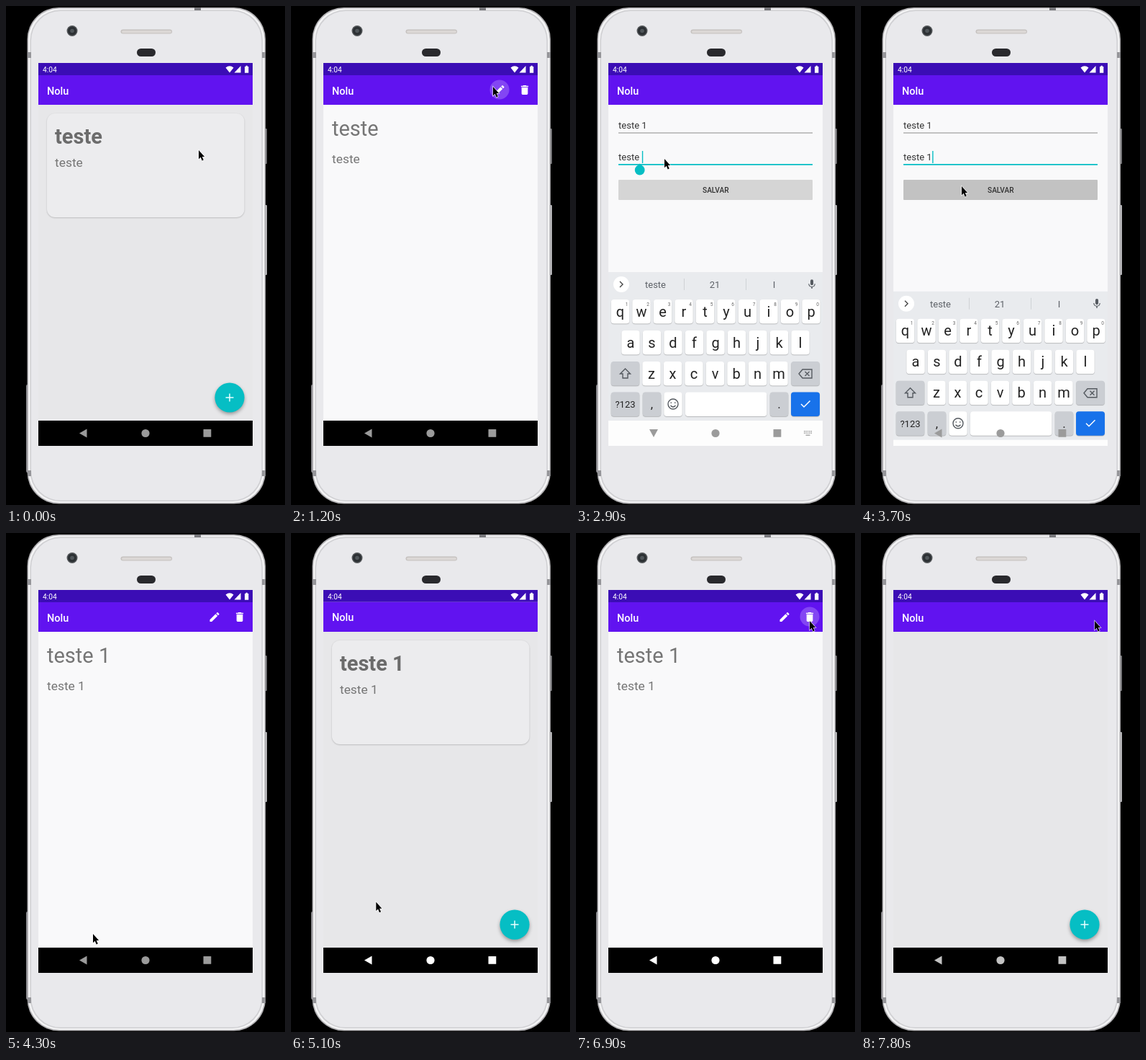
Recreate the animation shown at these times as an HTML page with a canvas. Size 388x692 px, loop 7900 ms.

```html
<!DOCTYPE html>
<html lang="pt">
<head>
<meta charset="utf-8">
<title>Nolu</title>
<style>
html, body { margin: 0; width: 100%; height: 100%; overflow: hidden; background: #000; }
canvas { display: block; }
</style>
</head>
<body>
<canvas id="stage" width="388" height="692"></canvas>
<script>
const ctx = document.getElementById('stage').getContext('2d');
const LOOP = 7900, STEP = 100;
const TEAL = '#06bec4', PURPLE = '#6113f0', DARK_PURPLE = '#3b0db5', GREY = '#757575';
const SCREEN = { x: 45, y: 79, w: 298, h: 531 };
const ICONS = {
  edit: 'M3 17.25V21h3.75L17.81 9.94l-3.75-3.75L3 17.25zM20.71 7.04a1 1 0 0 0 0-1.41l-2.34-2.34a1 1 0 0 0-1.41 0l-1.83 1.83 3.75 3.75z',
  trash: 'M6 19a2 2 0 0 0 2 2h8a2 2 0 0 0 2-2V7H6zM19 4h-3.5l-1-1h-5l-1 1H5v2h14z',
  mic: 'M12 14a3 3 0 0 0 3-3V5a3 3 0 0 0-6 0v6a3 3 0 0 0 3 3zM17.3 11a5.3 5.3 0 0 1-10.6 0H5a7 7 0 0 0 6 6.7V21h2v-3.3a7 7 0 0 0 6-6.7z',
  pointer: 'M0 0V13L3 10.3L5.2 15.3L7.5 14.3L5.3 9.5H9Z'
};

const clamp = v => Math.max(0, Math.min(1, v));
const between = (t, a, b) => t >= a && t < b;

function rect(x, y, w, h, color, r = 0) {
  ctx.fillStyle = color;
  ctx.beginPath();
  ctx.roundRect(x, y, w, h, r);
  ctx.fill();
}

function circle(x, y, r, color) {
  ctx.fillStyle = color;
  ctx.beginPath();
  ctx.arc(x, y, r, 0, 7);
  ctx.fill();
}

function text(s, x, y, size, color, weight = 400, align = 'left') {
  ctx.font = `${weight} ${size}px Roboto, sans-serif`;
  ctx.textAlign = align;
  ctx.fillStyle = color;
  ctx.fillText(s, x, y);
}

function poly(d, color) {
  ctx.fillStyle = color;
  ctx.fill(new Path2D(d));
}

function line(d, color, width = 1.4) {
  ctx.strokeStyle = color;
  ctx.lineWidth = width;
  ctx.stroke(new Path2D(d));
}

function icon(name, x, y, color, scale = 0.725) {
  ctx.save();
  ctx.translate(x, y);
  ctx.scale(scale, scale);
  ctx.translate(-12, -12);
  poly(ICONS[name], color);
  ctx.restore();
}

function shadowed(blur, dy, color, draw) {
  ctx.save();
  ctx.shadowBlur = blur;
  ctx.shadowOffsetY = dy;
  ctx.shadowColor = color;
  draw();
  ctx.restore();
}

function phone() {
  rect(0, 0, 388, 692, '#000');
  rect(359, 170, 4, 49, '#77777a', 1);
  rect(359, 276, 4, 97, '#b5b5b8', 1);
  rect(28, 525, 5, 122, '#8d8d91', 2);
  rect(29.5, 2, 331.5, 688.5, '#b1b0b3', 44);
  rect(31, 3.5, 328.5, 685.5, '#f4f4f5', 43);
  rect(33.5, 5.5, 323.5, 681.5, '#cfcfd2', 42);
  rect(35, 7, 320.5, 678.5, '#e9e9ec', 41);
  for (const y of [64, 644]) for (const x of [30, 356]) rect(x, y, 5, 8, '#96969a');
  rect(262, 2, 9, 4, '#77777b');
  rect(159.5, 32.5, 71.5, 6, '#c6c2c0', 3);
  rect(161, 34, 69, 3.5, '#dcd8d6', 2);
  circle(92, 34.5, 7.5, '#55585b');
  circle(92, 34.5, 6, '#2c3033');
  circle(92, 34.5, 2.8, '#50565a');
  rect(182, 59, 26, 11, '#29292d', 5.5);
}

function chrome(background) {
  rect(45, 79, 298, 531, background);
  rect(45, 79, 298, 17, DARK_PURPLE);
  rect(45, 96, 298, 41, PURPLE);
  text('Nolu', 57, 122.5, 14.5, '#fff', 500);
  rect(45, 575, 298, 35, '#000');
}

const list = note => t => {
  chrome('#e7e7e9');
  if (note) {
    shadowed(2, 0.7, 'rgba(0,0,0,.22)', () => rect(57, 149, 274.5, 144, '#ececee', 11));
    if (between(t, 400, 700) || between(t, 5800, 6000)) rect(57, 149, 274.5, 144, 'rgba(0,0,0,.06)', 11);
    text(note, 68, 191, 29, '#6b6b6b', 700);
    text(note, 68, 223, 17.4, GREY);
  }
  shadowed(5, 2.5, 'rgba(0,0,0,.35)', () => circle(311, 543, 20.6, TEAL));
  line('M305.5 543H316.5M311 537.5V548.5', '#e8ffff', 1.5);
};

const detail = note => t => {
  chrome('#f9f9fa');
  if (between(t, 1200, 1500)) circle(290, 116, 13.5, 'rgba(255,255,255,.22)');
  if (between(t, 6900, 7200)) circle(325, 116, 13.5, 'rgba(255,255,255,.22)');
  icon('edit', 290, 116.5, '#fff');
  icon('trash', 325, 116.5, '#fff');
  text(note, 57, 180, 29, GREY);
  text(note, 57, 217.5, 17.4, GREY);
};

function field(value, y, focused, handle) {
  text(value, 59, y, 13.05, '#333');
  const caret = 59.5 + ctx.measureText(value).width;
  if (!focused) return rect(59, y + 5.5, 270, 1, '#8b8b8b');
  rect(59, y + 5, 270, 1.7, TEAL);
  rect(caret, y - 13, 1.4, 17, TEAL);
  if (handle) {
    circle(88.7, y + 13.5, 6.9, TEAL);
    poly(`M88.7 ${y + 4.5}L94 ${y + 9.5}H83.4Z`, TEAL);
  }
}

function form(t) {
  const typed = (space, digit) => t < space ? 'teste' : t < digit ? 'teste ' : 'teste 1';
  const second = t >= 2600;
  chrome('#f9f9fa');
  field(typed(1900, 2200), 170, t >= 1700 && !second, t < 2200);
  if (between(t, 1800, 2200)) rect(59, 172, 29, 1, '#444');
  field(typed(2800, 3000), 214, second, between(t, 2700, 3000));
  rect(59, 241, 270, 28, between(t, 3600, 3900) ? '#c2c2c2' : '#d5d5d5', 1);
  text('SALVAR', 194.3, 258.6, 10.15, '#333', 500, 'center');
}

function key(x, y, w, label, size = 20, color = '#fff') {
  shadowed(1, 0.7, 'rgba(0,0,0,.28)', () => rect(x - w / 2, y - 17, w, 33.5, color, 4));
  if (label) text(label, x, y + size * 0.33, size, '#222', 400, 'center');
}

function keyboard(t) {
  const shift = t < 2200 ? 241 * (1 - clamp((t - 1700) / 500)) ** 2 : 241 * clamp((t - 3600) / 300) ** 2;
  if (t < 1700 || shift >= 241) return;
  const special = '#cbced3', ink = '#555a60';
  ctx.save();
  ctx.translate(0, shift);
  rect(45, 369, 298, 241, '#e9ebee');
  rect(45, 575, 298, 35, '#fdfdfd');
  circle(63, 386, 11, '#fff');
  line('M61 382L65 386L61 390', '#444');
  const words = t < 2300 ? ['teste', 'TESTE', 'teste2'] : ['teste', '21', 'I'];
  words.forEach((w, i) => text(w, 110.5 + i * 82.5, 391, 13, '#5d6167', 400, 'center'));
  rect(150, 378, 1, 16, '#cfd2d5');
  rect(236, 378, 1, 16, '#cfd2d5');
  icon('mic', 328, 386, ink, 0.68);
  [['qwertyuiop', 61.5, 424], ['asdfghjkl', 76, 467], ['zxcvbnm', 105, 510]].forEach(([letters, x, y], row) =>
    [...letters].forEach((c, i) => {
      const cx = x + i * 29.5;
      key(cx, y, 25.5, c);
      if (!row) text((i + 1) % 10, cx + 9, y - 8.5, 6.5, '#666', 400, 'center');
    }));
  key(68.5, 510, 39.5, '', 0, special);
  line('M68.5 503L61.5 510H65V516H72V510H75.5Z', ink);
  key(319, 510, 39.5, '', 0, special);
  line('M310 510L315 504H328V516H315ZM318.5 507L324.5 513M324.5 507L318.5 513', ink);
  key(68.5, 552.5, 39.5, '?123', 13, special);
  key(105.5, 552.5, 25.5, ',', 17, special);
  key(135, 552.5, 25.5);
  line('M142 552a7 7 0 1 0-14 0a7 7 0 1 0 14 0M131.5 554q3.5 4 7 0M132.3 549.5v1.5M137.7 549.5v1.5', ink);
  key(208.7, 552.5, 113.5);
  key(282.5, 552.5, 25.5, '.', 17, special);
  key(319, 552.5, 40, '', 0, '#1872ea');
  line(t < 2600 ? 'M311 552H322M318 548L322 552L318 556M326 547V557' : 'M313 552L317 556L325.5 547.5', '#fff', 1.5);
  ctx.restore();
}

function navigation(t) {
  const fade = clamp((t - 7600) / 200);
  const level = t < 4900 ? 155 : 255 - 60 * fade;
  const color = `rgb(${level},${level},${level})`;
  const typing = between(t, 2100, 3700);
  poly(typing ? 'M102 587H114L108 598Z' : 'M102 592.5L112.5 586.5V598.5Z', color);
  circle(194, 592.5, 5.6, color);
  rect(274.5, 587, 10.8, 10.8, color, 0.5);
  if (typing) {
    for (let i = 0; i < 10; i++) rect(317 + i % 5 * 2.4, 589 + Math.floor(i / 5) * 2.6, 1.4, 1.4, color);
    rect(319.5, 594.5, 6, 1.3, color);
  }
}

function status() {
  text('4:04', 51, 91.7, 10.2, '#fff');
  poly('M305.5 85.5Q311 81 316.5 85.5L311 92.5ZM326.5 83V92.5H317.5ZM332 84H333.5V82.8H335.8V84H337.3V92.7H332Z', '#fff');
}

const scenes = [
  { at: 0, draw: list('teste') },
  { at: 500, draw: detail('teste'), opens: true },
  { at: 1400, draw: form, opens: true },
  { at: 3700, draw: detail('teste 1') },
  { at: 4800, draw: list('teste 1') },
  { at: 5900, draw: detail('teste 1'), opens: true },
  { at: 7000, draw: list('') }
];

function scaled(draw, t, scale, alpha = 1) {
  ctx.save();
  ctx.globalAlpha = alpha;
  ctx.translate(194, 345);
  ctx.scale(scale, scale);
  ctx.translate(-194, -345);
  ctx.beginPath();
  ctx.rect(SCREEN.x, SCREEN.y, SCREEN.w, SCREEN.h);
  ctx.clip();
  draw(t);
  ctx.restore();
}

function windows(t) {
  const i = scenes.findLastIndex(s => t >= s.at);
  const { at, draw, opens } = scenes[i];
  const age = t - at;
  if (!i || age >= 400) return draw(t);
  const p = 1 - (1 - age / 400) ** 3.3;
  const previous = scenes[i - 1].draw;
  if (opens) {
    scaled(previous, t, 1 + 0.05 * p);
    scaled(draw, t, 0.85 + 0.15 * p, clamp(age / 90));
  } else {
    scaled(draw, t, 1.05 - 0.05 * p);
    scaled(previous, t, 1 - 0.15 * p, 1 - clamp(age / 180));
  }
}

// Pointer stops: time, x, y
const stops = [
  [0, 268, 200], [600, 268, 200], [1100, 281, 112], [1400, 281, 112], [1900, 140, 164],
  [2300, 140, 164], [2700, 123, 212], [3300, 123, 212], [3600, 140, 250], [3800, 140, 250],
  [4300, 121, 556], [4600, 108, 588], [4900, 108, 588], [5600, 160, 203], [6100, 160, 203],
  [6700, 325, 122], [LOOP, 325, 122]
];

function pointer(t) {
  const i = stops.findLastIndex(s => t >= s[0]);
  const [t0, x0, y0] = stops[i], [t1, x1, y1] = stops[i + 1];
  const u = (t - t0) / (t1 - t0), p = u * u * (3 - 2 * u);
  ctx.save();
  ctx.translate(x0 + (x1 - x0) * p, y0 + (y1 - y0) * p);
  ctx.scale(0.9, 0.95);
  line(ICONS.pointer, 'rgba(255,255,255,.8)', 1.5);
  poly(ICONS.pointer, '#000');
  ctx.restore();
}

function render(t) {
  phone();
  ctx.save();
  ctx.beginPath();
  ctx.rect(SCREEN.x, SCREEN.y, SCREEN.w, SCREEN.h);
  ctx.clip();
  windows(t);
  keyboard(t);
  navigation(t);
  status();
  ctx.restore();
  pointer(t);
}

function tick() {
  render(Math.floor(performance.now() % LOOP / STEP) * STEP);
  requestAnimationFrame(tick);
}
tick();
</script>
</body>
</html>
```
